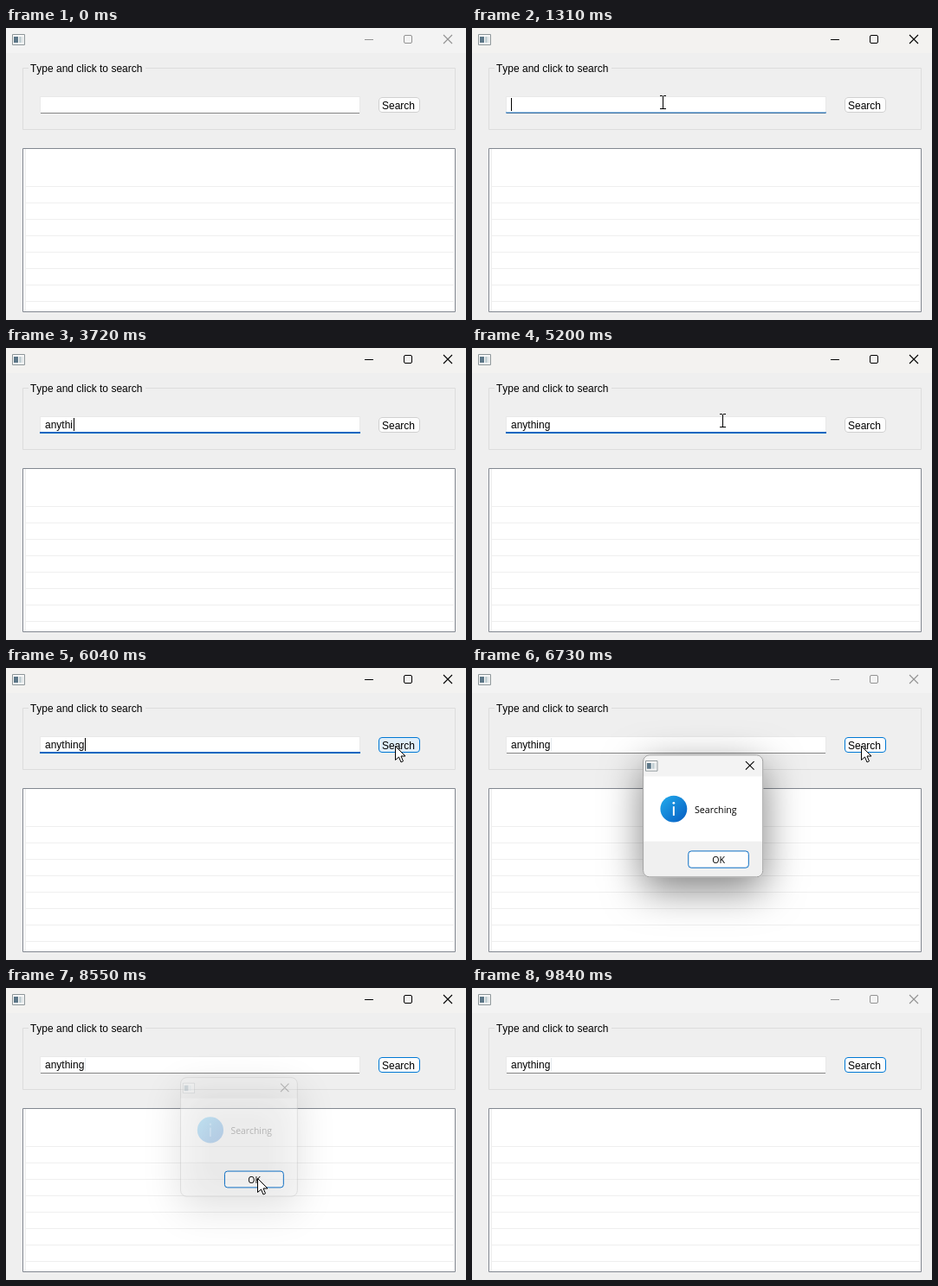
Animation of 531 by 338 pixels, one loop 9.91 s. Source, as an HTML page with a canvas:

```html
<!DOCTYPE html>
<html lang="en">
<head>
<meta charset="utf-8">
<title>Search window</title>
<style>
  html, body { margin: 0; width: 100%; height: 100%; overflow: hidden; background: #efefef; }
  canvas { display: block; }
</style>
</head>
<body>
<canvas id="stage" width="531" height="338"></canvas>
<script>
const ctx = document.getElementById('stage').getContext('2d');
const LOOP = 9910;
const BLUE = '#0067c0';
const UI_FONT = '12px "Liberation Sans", Arial, sans-serif';
const DIALOG_FONT = '11px "Open Sans", "Noto Sans", sans-serif';
const WORD = 'anything';
const KEY_TIMES = [1970, 2500, 2900, 3260, 3460, 3720, 3990, 4190];

// Pointer trips: each point is [time, x, y]
const TRIPS = [
  [[130, 428, 311], [960, 220, 86], [1970, 220, 86]],
  [[4920, 228, 82], [5250, 300, 84], [5600, 410, 106], [5900, 449, 90],
   [7110, 449, 90], [7400, 400, 131], [7740, 300, 215], [8010, 290, 220],
   [8820, 290, 220], [9440, 482, 338]]
];

const ramp = (t, from, to) => Math.min(1, Math.max(0, (t - from) / (to - from)));
const during = (t, from, to) => t >= from && t < to;

function rect(x, y, w, h, color) {
  ctx.fillStyle = color;
  ctx.fillRect(x, y, w, h);
}

function frame(x, y, w, h, color, radius = 0) {
  ctx.beginPath();
  ctx.roundRect(x + .5, y + .5, w - 1, h - 1, radius);
  ctx.strokeStyle = color;
  ctx.lineWidth = 1;
  ctx.stroke();
}

function text(str, x, y, font = UI_FONT, color = '#000') {
  ctx.font = font;
  ctx.fontKerning = 'none';
  ctx.fillStyle = color;
  ctx.fillText(str, x, y);
}

function button(x, y, w, h, border, hover) {
  ctx.beginPath();
  ctx.roundRect(x, y, w, h, 4);
  ctx.fillStyle = '#fdfdfd';
  ctx.fill();
  ctx.globalAlpha *= hover;
  ctx.fillStyle = '#e0eef9';
  ctx.fill();
  if (hover) ctx.globalAlpha /= hover; else ctx.globalAlpha = 1;
  frame(x, y, w, h, border, 3.5);
}

function closeCross(x, y, color) {
  ctx.beginPath();
  ctx.moveTo(x - 5, y - 5); ctx.lineTo(x + 5, y + 5);
  ctx.moveTo(x + 5, y - 5); ctx.lineTo(x - 5, y + 5);
  ctx.strokeStyle = color;
  ctx.lineWidth = 1.1;
  ctx.stroke();
}

function windowIcon(x, y) {
  rect(x, y, 15, 13, '#f8f8f8');
  frame(x, y, 15, 13, '#8d9699');
  rect(x + 2, y + 3, 5, 7, '#5c7788');
  rect(x + 8, y + 3, 3, 7, '#c3d0d4');
  rect(x + 12, y + 3, 1, 7, '#d5dcde');
}

function drawTitleBar(t) {
  const active = during(t, 1240, 6590) || during(t, 8480, 9840);
  const color = active ? '#000' : '#929292';
  rect(0, 0, 531, 29, active ? '#f3f2f0' : '#f3f3f3');
  windowIcon(7, 7);
  rect(414, 13, 10, 1, color);
  frame(459, 8, 10, 10, color, 1.5);
  closeCross(510, 13, color);
}

function drawInput(t) {
  rect(39, 79, 370, 20, '#e9e9e9');
  rect(40, 80, 368, 18, '#fff');
  rect(40, 98, 368, 1, '#868686');
  ctx.globalAlpha = ramp(t, 1200, 1440) * (1 - ramp(t, 6460, 6600));
  rect(39, 97, 370, 2, BLUE);
  ctx.globalAlpha = 1;

  const typed = WORD.slice(0, KEY_TIMES.filter(k => t >= k).length);
  text(typed, 45, 93);
  const caretX = Math.ceil(45 + ctx.measureText(typed).width);
  if (during(t, 1240, 4720) || during(t, 5970, 6590)) rect(caretX, 81, 1, 15, '#000');
  else if (t >= 6590) rect(caretX, 81, 1, 15, '#e3e8ec');
}

function drawWindow(t) {
  rect(0, 0, 531, 338, '#efefef');
  drawTitleBar(t);
  frame(19, 46, 500, 72, '#dcdcdc');
  rect(26, 44, 135, 5, '#efefef');
  text('Type and click to search', 28, 51);
  drawInput(t);

  const hover = t < 6460 ? ramp(t, 5830, 6000) : 0;
  button(430, 80, 48, 18, t < 5850 ? '#d0d0d0' : '#0078d4', hover);
  text('Search', 434, 94);

  rect(19, 139, 500, 190, '#fff');
  for (let y = 183; y < 328; y += 19) rect(23, y, 494, 1, '#efefef');
  rect(22, 140, 1, 188, '#efefef');
  frame(19, 139, 500, 190, '#828790');
}

function infoIcon(x, y) {
  const shade = ctx.createLinearGradient(x - 11, y - 11, x + 11, y + 11);
  shade.addColorStop(0, '#1ea0e6');
  shade.addColorStop(1, '#0a68c8');
  ctx.beginPath();
  ctx.arc(x, y, 16, 0, 7);
  ctx.fillStyle = shade;
  ctx.fill();
  ctx.beginPath();
  ctx.arc(x, y - 7, 1.4, 0, 7);
  ctx.fillStyle = '#fff';
  ctx.fill();
  rect(x - 1, y - 3, 2, 11, '#fff');
}

function drawDialog(t) {
  if (!during(t, 6540, 8620)) return;
  const opening = ramp(t, 6540, 6850);
  const closing = ramp(t, 8400, 8600);
  const scale = 1 - .23 * (1 - opening) ** 2 - .1 * closing ** 2;
  const [originX, originY] = closing ? [268, 172] : [200, 138];

  ctx.save();
  ctx.globalAlpha = Math.min(1, opening * 2.2) * (1 - closing);
  ctx.translate(originX, originY);
  ctx.scale(scale, scale);
  ctx.translate(-originX, -originY);

  ctx.save();
  ctx.shadowColor = 'rgba(0,0,0,.5)';
  ctx.shadowBlur = 46;
  ctx.shadowOffsetY = 14;
  ctx.beginPath();
  ctx.roundRect(197, 99, 144, 147, 8);
  ctx.fillStyle = '#f3f3f3';
  ctx.fill();
  ctx.restore();

  ctx.save();
  ctx.clip();
  rect(197, 125, 144, 78, '#fff');
  rect(197, 203, 144, 43, '#f0f0f0');
  ctx.restore();
  frame(197, 99, 144, 147, '#9c9c9c', 7.5);

  windowIcon(200, 106);
  closeCross(325, 112, '#000');
  infoIcon(234, 164);
  text('Searching', 259, 169, DIALOG_FONT);
  button(251, 214, 73, 21, BLUE, t < 8340 ? ramp(t, 7750, 7950) : 0);
  text('OK', 280, 229, DIALOG_FONT);
  ctx.restore();
}

function pointerAt(t) {
  for (const trip of TRIPS) {
    for (let i = 1; i < trip.length; i++) {
      const [t0, x0, y0] = trip[i - 1], [t1, x1, y1] = trip[i];
      if (!during(t, t0, t1)) continue;
      const k = ramp(t, t0, t1);
      return [Math.round(x0 + (x1 - x0) * k), Math.round(y0 + (y1 - y0) * k)];
    }
  }
}

function drawPointer(t) {
  const spot = pointerAt(t);
  if (!spot) return;
  const [x, y] = spot;
  if (x > 39 && x < 409 && y > 79 && y < 99) {
    rect(x, y - 7, 1, 15, '#000');
    for (const end of [y - 8, y + 7]) {
      rect(x - 3, end, 3, 1, '#000');
      rect(x + 1, end, 3, 1, '#000');
    }
    return;
  }
  ctx.save();
  ctx.translate(x + .5, y + .5);
  ctx.fillStyle = '#fff';
  ctx.strokeStyle = '#000';
  ctx.lineWidth = 1;
  const arrow = new Path2D('M0 0V16L4 12.5L6.5 18.5L9 17.3L6.5 11.5H11.5Z');
  ctx.fill(arrow);
  ctx.stroke(arrow);
  ctx.restore();
}

function draw(now) {
  const t = now % LOOP;
  drawWindow(t);
  drawDialog(t);
  drawPointer(t);
}

const start = performance.now();
function tick() {
  draw(performance.now() - start);
  requestAnimationFrame(tick);
}
tick();
</script>
</body>
</html>
```
